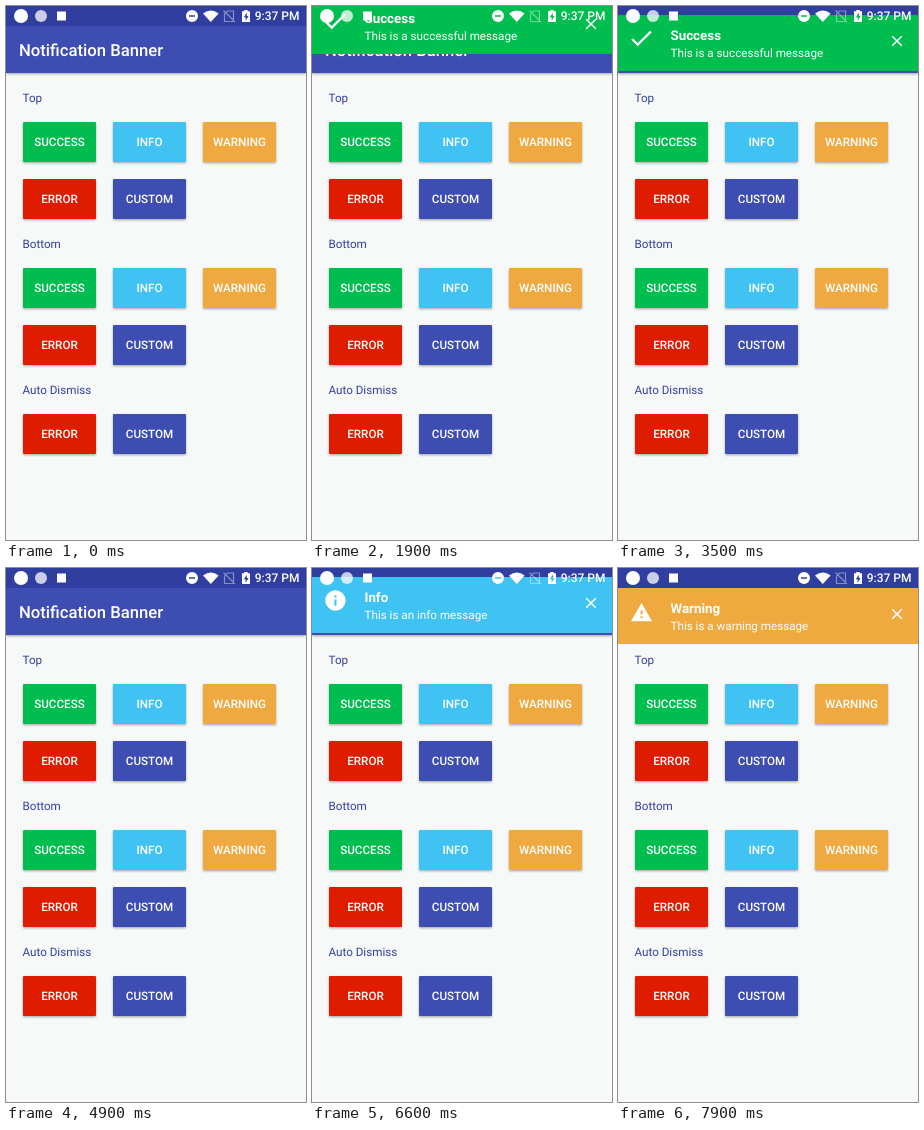
Write an HTML page that moves like this. It is 300x534 px and loops after 8000 ms.

```html
<!DOCTYPE html>
<html lang="en">
<head>
<meta charset="utf-8">
<title>Notification Banner</title>
<style>
  html, body { margin: 0; width: 100%; height: 100%; overflow: hidden; background: #f7f9f8; }
  svg { display: block; width: 300px; height: 534px; font: 11.67px Roboto, sans-serif; text-rendering: geometricPrecision; }
  .medium { font-weight: 500; }
  .label { fill: #303f9f; }
  .white { fill: #fff; }
  .heading { font-size: 13.33px; font-weight: 700; }
  .bar-title { font-size: 16.67px; }
  .clock { font-size: 12px; }
  .button text { text-anchor: middle; fill: #fff; font-weight: 500; }
</style>
</head>
<body>
<svg viewBox="0 0 300 534">
  <defs>
    <filter id="lift" x="-10%" y="-10%" width="120%" height="130%">
      <feDropShadow dx="0" dy="1.2" stdDeviation="0.9" flood-opacity="0.32"/>
    </filter>
  </defs>

  <rect width="300" height="534" fill="#f7f9f8"/>
  <rect y="20" width="300" height="47" fill="#3c4eb2" filter="url(#lift)"/>
  <rect width="300" height="20" fill="#303f9f"/>
  <text class="white medium bar-title" x="13" y="50">Notification Banner</text>
  <g id="page"></g>

  <g id="banner">
    <rect id="panel" y="20" width="300" height="56"/>
    <path id="icon" class="white" fill-rule="evenodd"/>
    <text id="heading" class="white heading" x="52.5" y="45.3"></text>
    <text id="message" class="white" x="52.5" y="61.5"></text>
    <path d="M274.2 41.2l9.6 9.6m0-9.6l-9.6 9.6" stroke="#fff" stroke-width="1.5"/>
  </g>

  <g class="white">
    <circle cx="15" cy="10" r="7"/>
    <circle cx="35" cy="10" r="6" opacity="0.75"/>
    <rect x="51" y="5.5" width="9" height="9"/>
    <path fill-rule="evenodd" d="M186 4a6 6 0 1 0 0 12a6 6 0 1 0 0-12zM183 9.2h6v1.6h-6z"/>
    <path d="M197 7.4Q205 1.8 212.6 7.4L204.8 16z"/>
    <path d="M221.5 5h6v10.5h-9v-7.5zM217.5 4.5l11.5 11.5" fill="none" stroke="#fff" stroke-width="1.2" opacity="0.42"/>
    <path fill-rule="evenodd" d="M238.3 4h3.4v1.3h2.3v10.7h-8V5.3h2.3zM240.8 6.8l-3 4.5h1.8v3.4l3-4.6h-1.8z"/>
    <text class="medium clock" x="293.5" y="14.4" text-anchor="end">9:37 PM</text>
  </g>
</svg>

<script>
const LOOP = 8000;
const STEP = 100;
const REST_IN = 400;
const COLORS = {
  SUCCESS: '#00bd4f', INFO: '#3fc3f2', WARNING: '#f0a93f', ERROR: '#e01e00', CUSTOM: '#3c4eb2'
};
const COLUMNS = [17, 107, 197];
const SECTIONS = [
  { label: 'Top', y: 96, rows: [[116, 'SUCCESS', 'INFO', 'WARNING'], [173, 'ERROR', 'CUSTOM']] },
  { label: 'Bottom', y: 242, rows: [[262, 'SUCCESS', 'INFO', 'WARNING'], [319, 'ERROR', 'CUSTOM']] },
  { label: 'Auto Dismiss', y: 388, rows: [[408, 'ERROR', 'CUSTOM']] }
];
const BANNERS = [
  {
    enter: 1900, leave: 3500, kind: 'SUCCESS', heading: 'Success', message: 'This is a successful message',
    icon: 'M9 16.17L4.83 12l-1.42 1.41L9 19 21 7l-1.41-1.41z', place: 'translate(9.2 29.1) scale(1.17)'
  },
  {
    enter: 5000, leave: 6600, kind: 'INFO', heading: 'Info', message: 'This is an info message',
    icon: 'M12 2a10 10 0 1 0 0 20a10 10 0 1 0 0-20zM11 11h2v6h-2zM11 7h2v2h-2z',
    place: 'translate(11.2 31.3) scale(1.02)'
  },
  {
    enter: 7500, leave: LOOP, kind: 'WARNING', heading: 'Warning', message: 'This is a warning message',
    icon: 'M1 21h22L12 2zM11 16h2v2h-2zM11 10h2v4h-2z', place: 'translate(12 33) scale(0.96)'
  }
];

const byId = id => document.getElementById(id);
const [page, banner, panel, icon, heading, message] =
  ['page', 'banner', 'panel', 'icon', 'heading', 'message'].map(byId);

function add(parent, tag, attrs, text = '') {
  const node = document.createElementNS('http://www.w3.org/2000/svg', tag);
  for (const key in attrs) node.setAttribute(key, attrs[key]);
  node.textContent = text;
  return parent.appendChild(node);
}

for (const { label, y, rows } of SECTIONS) {
  add(page, 'text', { class: 'label', x: 16.5, y }, label);
  for (const [top, ...names] of rows) {
    names.forEach((name, i) => {
      const g = add(page, 'g', { class: 'button' });
      add(g, 'rect', {
        x: COLUMNS[i], y: top, width: 73, height: 40, rx: 1, fill: COLORS[name], filter: 'url(#lift)'
      });
      add(g, 'text', { x: COLUMNS[i] + 36.5, y: top + 24.4 }, name);
    });
  }
}

// Slides in with a cubic slow-down, then jumps up briefly before it is dismissed.
function offset(item, t) {
  if (t >= item.leave) return -11;
  const left = Math.max(0, 1 - (t - item.enter) / REST_IN);
  return -28 * left ** 3;
}

let shown = null;
function show(item) {
  if (item === shown) return;
  shown = item;
  banner.style.display = item ? '' : 'none';
  if (!item) return;
  panel.setAttribute('fill', COLORS[item.kind]);
  icon.setAttribute('d', item.icon);
  icon.setAttribute('transform', item.place);
  heading.textContent = item.heading;
  message.textContent = item.message;
}

banner.style.display = 'none';
const start = performance.now();

function draw() {
  const elapsed = Math.max(0, performance.now() - start) % LOOP;
  const t = Math.floor(elapsed / STEP) * STEP;
  const item = BANNERS.find(b => t >= b.enter && t < b.leave + STEP) || null;
  show(item);
  if (item) banner.setAttribute('transform', `translate(0 ${offset(item, t)})`);
  requestAnimationFrame(draw);
}
draw();
</script>
</body>
</html>
```
